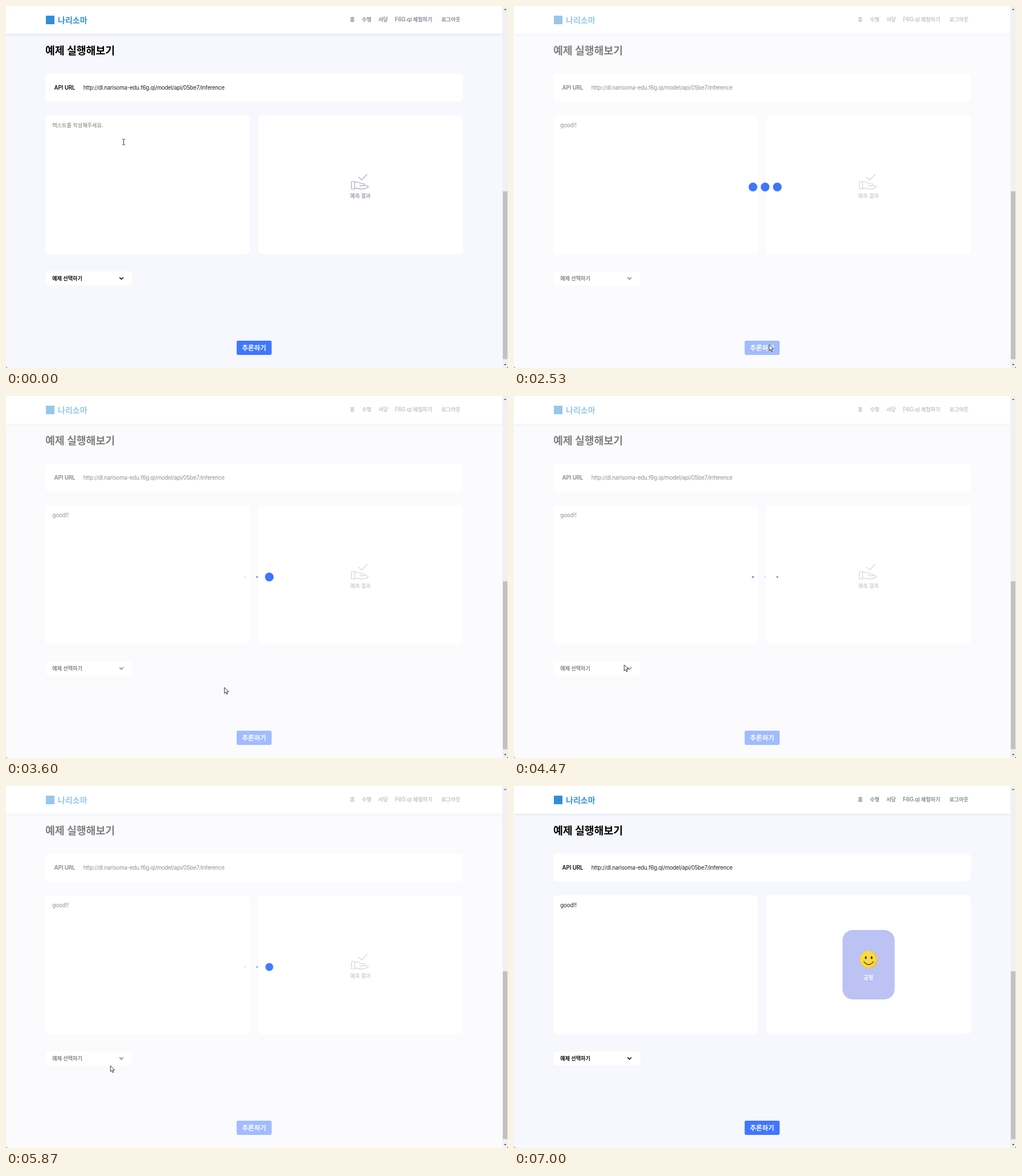
An HTML page that plays this animation: 881x636 px, repeating every 7790 ms.

```html
<!DOCTYPE html>
<html lang="ko">
<head>
<meta charset="utf-8">
<title>예제 실행해보기</title>
<style>
  html, body { margin: 0; width: 100%; height: 100%; overflow: hidden; background: #777; }
  svg { display: block; width: 881px; height: 636px; border-radius: 0 0 4px 4px; }
  text {
    font: 400 9.2px Inter, "Noto Sans CJK KR", "Noto Sans CJK", sans-serif;
    letter-spacing: -.005em;
    fill: #222;
    white-space: pre;
  }
  .latin { font-size: 9.76px; letter-spacing: -.026em; }
  .loose { letter-spacing: -.01em; }
  .bold { font-weight: 700; }
  .semi { font-weight: 600; fill: #111; }
  .mid { text-anchor: middle; }
  .title { font-size: 18.4px; font-weight: 700; fill: #000; }
  .brand { font-size: 14px; font-weight: 700; letter-spacing: 0; fill: #2f90d8; }
  .nav text { font-weight: 600; fill: #8a8c99; }
  .button { font-size: 11.5px; font-weight: 700; fill: #fff; }
  .hint { fill: #757575; }
  .line { fill: none; stroke: #b0b3c2; stroke-width: 1.4; stroke-linejoin: round; }
  .card { fill: #fff; }
  .head { filter: drop-shadow(0 1px 2px rgba(60, 64, 100, .14)); }
  .pointer { fill: #fff; stroke: #000; stroke-width: .8; stroke-linejoin: round; }
</style>
</head>
<body>
<svg viewBox="0 0 881 636">
  <rect width="871" height="636" fill="#f7f8fe"/>
  <rect class="card head" width="871" height="49"/>
  <rect x="70" y="17" width="15" height="15" fill="#2f90d8"/>
  <text class="brand" x="91" y="29.8">나리소마</text>
  <g class="nav">
    <text x="603.4" y="27.3">홈</text>
    <text x="624.4" y="27.3">수행</text>
    <text x="653.4" y="27.3">서당</text>
    <text x="682.5" y="27.3"><tspan class="latin">F6G.qi</tspan> 체험하기</text>
    <text x="763.9" y="27.3">로그아웃</text>
  </g>

  <text class="title" x="69" y="84.8">예제 실행해보기</text>

  <rect class="card" x="69" y="119" width="732.5" height="49" rx="6"/>
  <text class="semi latin loose" x="84.5" y="146.5">API URL</text>
  <text class="latin" x="135.8" y="146.5">http://dl.narisoma-edu.f6g.qi/model/api/05be7/inference</text>

  <rect class="card" x="69" y="192" width="358.7" height="244" rx="6"/>
  <text class="hint" id="hint" x="81.2" y="212.6">텍스트를 작성해주세요.</text>
  <text class="latin loose" id="typed" x="81.2" y="213"></text>
  <rect id="caret" y="204" width=".8" height="11.5" fill="#111"/>

  <rect class="card" x="442.8" y="192" width="358.7" height="244" rx="6"/>
  <g id="empty">
    <path class="line" d="M618.5 300.2l5.8 5.6 9.7-10.3"/>
    <path class="line" d="M606.4 308.4h5.4v13.2h-5.4z
      M612 309.4h5.2c3.2 0 4.6 3 7.2 3h3.4c2.2 0 2.2 3.3 0 3.3h-7.2
      M628.5 315.6c4-.6 7.6.4 7.4 2.3c-3 2-7 3.7-12 3.7c-4 0-7-1.8-11.6-1.8"/>
    <text class="mid bold" x="622" y="336.6" style="fill:#a0a2b0">예측 결과</text>
  </g>
  <g id="result">
    <rect x="576.5" y="253" width="91.5" height="122" rx="18.3" fill="#bcc2f3"/>
    <circle cx="622.5" cy="305" r="15.2" fill="#f3c534"/>
    <ellipse cx="621.3" cy="304.4" rx="13.9" ry="14.5" fill="#ffd93b"/>
    <g fill="#3e4347">
      <ellipse cx="617.4" cy="301.6" rx="1.8" ry="2.6"/>
      <ellipse cx="627.6" cy="301.6" rx="1.8" ry="2.6"/>
    </g>
    <path d="M614 308.6q8.4 10.4 16.8 0" fill="none" stroke="#3e4347" stroke-width="1.5" stroke-linecap="round"/>
    <text class="mid bold" x="622" y="340.3" style="fill:#fff">긍정</text>
  </g>

  <rect class="card" x="69.5" y="466.3" width="152.5" height="24.6" rx="5"/>
  <text class="semi" x="81.2" y="481.8">예제 선택하기</text>
  <path d="M199.2 476.7l3.4 3.4 3.4-3.4" fill="none" stroke="#111" stroke-width="1.6"/>

  <rect x="404.8" y="588" width="61.4" height="25" rx="2.4" fill="#4077ff"/>
  <text class="button mid" x="435.4" y="605">추론하기</text>

  <g id="loading">
    <rect width="871" height="636" fill="#fff" opacity=".5"/>
    <g id="dots" fill="#3d76ff">
      <circle cx="419.4" cy="318" r="7.63"/>
      <circle cx="440.7" cy="318" r="7.63"/>
      <circle cx="462.1" cy="318" r="7.63"/>
    </g>
  </g>

  <rect x="871" width="10" height="636" fill="#f1f1f1"/>
  <rect x="872" y="325.5" width="8" height="295" fill="#c1c1c1"/>
  <path d="M873.8 7l2.3-2.6 2.3 2.6z" fill="#606060"/>
  <path d="M873.8 629l2.3 2.6 2.3-2.6z" fill="#505050"/>

  <g id="cursor">
    <path id="arrow" class="pointer" d="M0 0v10.4l2.4-2.2 1.7 3.8 1.7-.8-1.7-3.6 3.3-.2z"/>
    <path id="beam" d="M-2.5-4.8h1.7l.8.5.8-.5h1.7M0-4.3v8.6M-2.5 4.8h1.7l.8-.5.8.5h1.7" fill="none" stroke="#222" stroke-width=".9"/>
    <path id="hand" class="pointer" d="M-1 1q1-1.6 2 0v4l1.6.3.4.3 1.7.2.4.4q1.8 0 1.8 1.6v2.4l-1.3 2.5v1.2h-5.4v-1.1l-3.4-4.4q-.4-1.8 1.2-1.2l1 1.2z"/>
  </g>
</svg>
<script>
const LOOP = 7790;
const LOAD = 2530, DONE = 6200;
const PULSE_START = 2620, PULSE = 750, STAGGER = 120;

// [time, typed text, caret visible]
const typing = [
  [0, '', false], [70, '', true], [670, '', false],
  [800, 'g', true], [930, 'go', true], [1070, 'goo', true], [1200, 'good', true],
  [1670, 'good', false], [1800, 'good!', true], [1930, 'good!!', true], [2470, 'good!!', false]
];

// [time, x, y]
const path = [
  [0, 206.5, 239], [70, 195, 238], [130, 188.7, 237], [1670, 188.7, 237],
  [1800, 203, 260], [2000, 310, 425], [2200, 425, 570], [2330, 448, 595], [2530, 448, 595],
  [2670, 450, 600], [2800, 448, 603], [3000, 437, 585], [3200, 418, 554],
  [3600, 383.3, 512], [4000, 363.5, 511], [4470, 193.3, 472.4], [4800, 193.5, 474],
  [5200, 192, 478], [5600, 187, 493], [5670, 183.3, 491.5], [6470, 183.3, 491.5],
  [6730, 120, 560], [6930, 55, 634], [7000, 40, 660]
];

const $ = id => document.getElementById(id);
const show = (id, on) => { $(id).style.display = on ? '' : 'none'; };
const inside = (x, y, l, t, r, b) => x > l && x < r && y > t && y < b;
const lastAt = (keys, t) => keys.findLastIndex(k => k[0] <= t);

function bezier(x1, y1, x2, y2) {
  const at = (a, b, s) => 3 * a * s * (1 - s) ** 2 + 3 * b * s * s * (1 - s) + s ** 3;
  return x => {
    let lo = 0, hi = 1;
    for (let i = 0; i < 24; i++) {
      const m = (lo + hi) / 2;
      if (at(x1, x2, m) < x) lo = m; else hi = m;
    }
    return at(y1, y2, lo);
  };
}
const ease = bezier(.2, .68, .18, 1.08);

// 1 = full size, 0 = smallest
function pulse(t) {
  if (t < 0) return 1;
  const p = t % PULSE / PULSE;
  if (p < .45) return 1 - ease(p / .45);
  return p < .8 ? ease((p - .45) / .35) : 1;
}

function drawText(t) {
  const [, text, caretOn] = typing[lastAt(typing, t)];
  const typed = $('typed');
  if (typed.textContent !== text) typed.textContent = text;
  show('hint', !text);
  show('caret', caretOn);
  $('caret').setAttribute('x', 81.5 + (text ? typed.getComputedTextLength() : 0));
}

function drawCursor(t, loading) {
  const i = lastAt(path, t);
  const a = path[i], b = path[i + 1] || a;
  const f = a === b ? 0 : (t - a[0]) / (b[0] - a[0]);
  const x = a[1] + (b[1] - a[1]) * f;
  const y = a[2] + (b[2] - a[2]) * f;
  let kind = 'arrow';
  if (!loading && inside(x, y, 69, 192, 428, 436)) kind = 'beam';
  if (!loading && inside(x, y, 405, 588, 466, 613)) kind = 'hand';
  for (const id of ['arrow', 'beam', 'hand']) show(id, id === kind);
  $('cursor').setAttribute('transform', `translate(${x} ${y})`);
}

function drawDots(t) {
  [...$('dots').children].forEach((dot, i) => {
    const s = pulse(t - PULSE_START - i * STAGGER);
    dot.setAttribute('r', 7.63 * (.1 + .9 * s));
    dot.setAttribute('opacity', Math.min(1, .7 + .3 * s));
  });
}

function draw(now) {
  // the screen updates 15 times a second
  const tick = Math.floor((now % LOOP + 3.4) * 3 / 200);
  const t = Math.round(tick * 20 / 3) * 10;
  const loading = t >= LOAD && t < DONE;
  drawText(t);
  drawDots(t);
  show('loading', loading);
  show('empty', t < DONE);
  show('result', t >= DONE);
  drawCursor(t, loading);
}

const start = performance.now();
function loop() {
  draw(performance.now() - start);
  requestAnimationFrame(loop);
}
loop();
</script>
</body>
</html>
```
